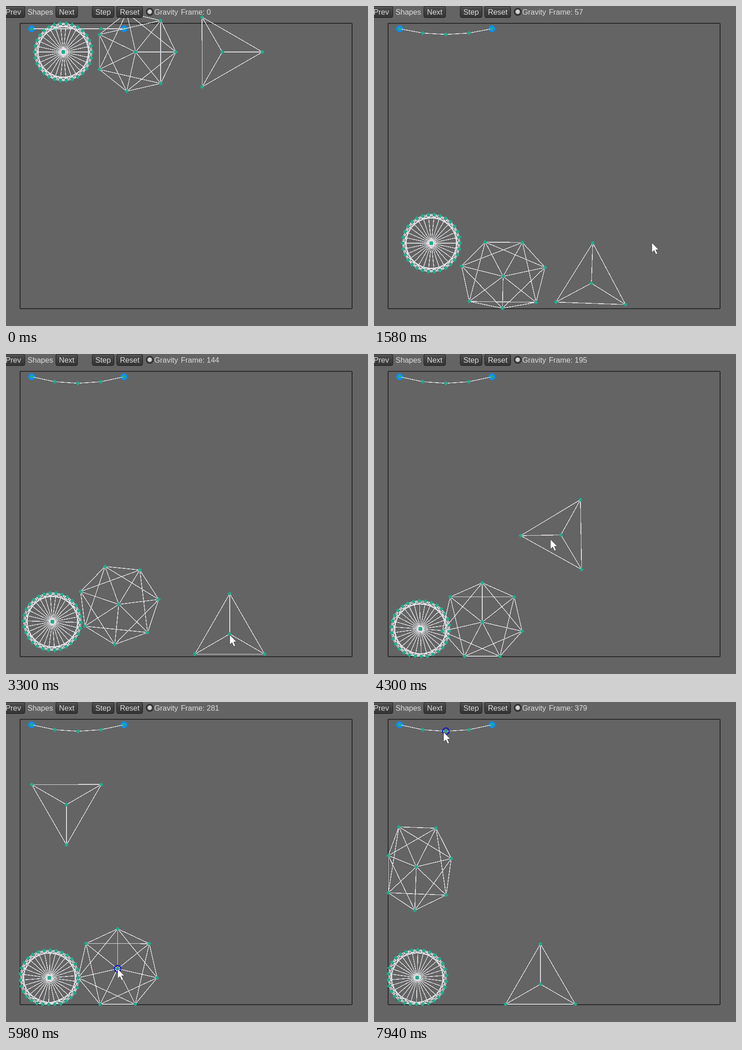
An HTML page for the animation above (8 s loop, 796 by 703 pixels).

```html
<!DOCTYPE html>
<html lang="en">
<head>
<meta charset="utf-8">
<title>Verlet shapes</title>
<style>
html, body { margin: 0; width: 100%; height: 100%; overflow: hidden; background: #646464; }
svg { display: block; width: 100%; height: 100%; }
text { font: 16.5px "Liberation Sans", Arial, sans-serif; fill: #dcdcdc; white-space: pre; }
.line { fill: none; stroke: #e0e0e4; stroke-width: 1.45; shape-rendering: crispEdges; }
.node { fill: #22ab8b; }
</style>
</head>
<body>
<svg viewBox="0 0 796 703">
  <defs>
    <linearGradient id="face" x1="0" y1="0" x2="0" y2="1">
      <stop offset="0" stop-color="#505050"/>
      <stop offset=".5" stop-color="#3c3c3c"/>
      <stop offset="1" stop-color="#303030"/>
    </linearGradient>
  </defs>
  <rect width="796" height="703" fill="#646464"/>
  <rect x="31" y="38" width="730" height="627" rx="1.5" fill="none" stroke="#292929" stroke-width="2"/>
  <g id="scene"></g>
  <g id="ui"></g>
  <circle id="ring" r="7.2" fill="none" stroke="#0808d8" stroke-width="2"/>
  <path id="mouse" d="M0 0V21.5L5 17L8.8 25.5L12.4 24L8.6 15.6H15Z" fill="#fff" stroke="#333" stroke-width=".8"/>
</svg>
<script>
const LOOP = 8000, STEP = 77.5, TICKS_PER_STEP = 3.915;
const GRAVITY = 0.46; // pixels per tick squared
const BOX = { left: 31.5, right: 760.5, top: 38.5, bottom: 664 };
const $ = id => document.getElementById(id);

function add(parent, tag, attrs, text) {
  const el = document.createElementNS("http://www.w3.org/2000/svg", tag);
  for (const k in attrs) el.setAttribute(k, attrs[k]);
  if (text) el.textContent = text;
  parent.appendChild(el);
  return el;
}

// Simulation tick shown at a moment; the picture advances in even holds
function tickAt(ms) {
  if (ms < 500) return 0;
  const n = Math.min(96, Math.floor((ms - 470) / STEP));
  return Math.floor(3.175 + TICKS_PER_STEP * n);
}

// Poses: tick, x, y, degrees; a pose marked FLY starts a free flight
const FLY = true;
const wheelPath = [
  [0, 126, 101, 0, FLY], [47, 126, 603, 0], [57, 126, 521, 0, FLY], [102, 97, 602, 2, FLY],
  [144, 102, 588, 1.5, FLY], [152, 102, 604, 3], [195, 102, 604, 4.2],
  [281, 95.5, 606, 7.4], [379, 95, 605.5, 7.4]
];
const heptagonPath = [
  [0, 285, 101, 0, FLY], [46, 285, 575, 0], [57, 284, 594, -11.9], [90, 284, 588, 12.9],
  [117, 222, 440, 0, FLY], [144, 248, 550, -7.1, FLY], [152, 240, 589, 12.9], [195, 238, 589, 12.9],
  [281, 245.5, 586, 12.9], [303, 372, 352, 5, FLY], [316, 672, 229, 10, FLY],
  [339, 512, 115, -5.2, FLY], [379, 93, 362, -10.9]
];
const trianglePath = [
  [0, 475.5, 101, 0, FLY], [46, 475.5, 587, 0], [57, 478, 609, 32], [80, 492, 615, 30],
  [149, 492, 615, 30], [192, 381, 402, 57, FLY], [195, 411, 397.5, 59, FLY], [216, 675, 460, 110, FLY],
  [237, 585, 600, 150], [249, 450, 430, 120, FLY], [281, 133, 225.5, 90, FLY],
  [324, 225, 590, 115, FLY], [339, 324, 599, 139.8], [360, 366, 620, 150]
];

function sample(path, tick) {
  const i = path.findIndex(p => p[0] > tick);
  if (i < 0) return path[path.length - 1];
  if (i === 0) return path[0];
  const a = path[i - 1], b = path[i], dt = b[0] - a[0], s = (tick - a[0]) / dt;
  const out = [0, 1, 2, 3].map(j => a[j] + (b[j] - a[j]) * s);
  if (a[4]) out[2] -= GRAVITY / 2 * dt * dt * s * (1 - s);
  return out;
}

const clamp = (v, lo, hi) => Math.min(hi, Math.max(lo, v));
const pt = p => p[0].toFixed(1) + " " + p[1].toFixed(1);
const seg = (a, b) => "M" + pt(a) + "L" + pt(b);
const diamond = p => "M" + pt([p[0], p[1] - 4.6]) + "l4.6 4.6l-4.6 4.6l-4.6 -4.6z";

const scene = $("scene");
for (const cx of [56.5, 259.5]) add(scene, "circle", { cx, cy: 50, r: 7.6, fill: "#0a8ff2" });
const layer = () => ({
  lines: add(scene, "path", { class: "line" }),
  nodes: add(scene, "path", { class: "node" })
});
const rope = layer();
const makeBody = (n, r, path) => ({ n, r, path, ...layer() });
const wheel = makeBody(30, 63.3, wheelPath);
const hub = add(scene, "rect", { class: "node", width: 8, height: 8, rx: 2 });
const heptagon = makeBody(7, 88.5, heptagonPath);
const triangle = makeBody(3, 88.5, trianglePath);

// Grabs: body, first tick, release tick
const grabs = [[heptagon, 90, 117], [triangle, 149, 192], [triangle, 237, 249], [heptagon, 281, 303]];
const mousePath = [
  [37, 735, 545], [43, 735, 545], [57, 611, 520], [144, 492, 617],
  [195, 388, 407], [339, 227, 270], [379, 153, 66]
];
for (const [body, from, to] of grabs) {
  for (const tick of [from, to]) mousePath.push([tick, ...sample(body.path, tick).slice(1, 3)]);
}
mousePath.sort((a, b) => a[0] - b[0]);

// Pressed against a wall by share e, an axis shrinks at its ends and bulges inside
const squash = (v, r, e, side) => v * (1 + e * (0.4 - 0.85 * v * v / (r * r)) + 0.3 * side);

function drawBody(body, tick) {
  const { n, r } = body, [, x, y, deg] = sample(body.path, tick);
  const top = tick < 25 ? -99 : BOX.top;
  const rim = Array.from({ length: n }, (_, i) => {
    const a = deg * Math.PI / 180 + i * 2 * Math.PI / n;
    return [r * Math.cos(a), r * Math.sin(a)];
  });
  const ex = Math.max(0, ...rim.map(p => Math.max(BOX.left - x - p[0], x + p[0] - BOX.right))) / r;
  const ey = Math.max(0, ...rim.map(p => Math.max(top - y - p[1], y + p[1] - BOX.bottom))) / r;
  const pts = rim.map(([u, v]) => [
    clamp(x + squash(u, r, ex, ey), BOX.left, BOX.right),
    clamp(y + squash(v, r, ey, ex), top, BOX.bottom)
  ]);
  const c = [x, y], skip = Math.floor(Math.sqrt(n));
  let d = "";
  pts.forEach((p, i) => {
    d += seg(c, p) + seg(p, pts[(i + 1) % n]);
    if (skip > 1) d += seg(p, pts[(i + skip) % n]);
  });
  body.lines.setAttribute("d", d);
  body.nodes.setAttribute("d", pts.concat(body === wheel ? [] : [c]).map(diamond).join(""));
  return body.center = c;
}

function drawRope(tick) {
  const sag = 14.3 * (1 - Math.cos(tick * 0.1) * Math.exp(-tick / 30));
  const pts = [0, 0.76, 1, 0.76, 0].map((k, i) => [56.5 + i * 50.75, 50 + sag * k]);
  rope.lines.setAttribute("d", "M" + pts.map(pt).join("L"));
  rope.nodes.setAttribute("d", pts.map(diamond).join(""));
  return pts[2];
}

const ui = $("ui");
const label = (x, s, anchor = "start") => add(ui, "text", { x, y: 18.6, "text-anchor": anchor }, s);
for (const [x, w, s] of [[-10, 52, "Prev"], [109, 49, "Next"], [189, 49, "Step"], [243, 58, "Reset"]]) {
  add(ui, "rect", { x: x + .5, y: .5, width: w - 1, height: 25, rx: 4, fill: "url(#face)", "fill-opacity": .92, stroke: "#1b1b1b" });
  add(ui, "path", { d: `M${x + 4} 1.7H${x + w - 4}`, stroke: "#6a6a6a", "stroke-width": .8 });
  label(x + w / 2, s, "middle");
}
label(47.5, "Shapes");
add(ui, "circle", { cx: 316, cy: 13, r: 7.7, fill: "#484848", stroke: "#1e1e1e", "stroke-width": 1.4 });
add(ui, "circle", { cx: 316, cy: 12.6, r: 4.8, fill: "#d2d2d2" });
label(326, "Gravity");
const counter = label(384.4, "Frame: 0");

function draw(tick) {
  counter.textContent = "Frame: " + tick;
  const mid = drawRope(tick);
  for (const body of [wheel, heptagon, triangle]) drawBody(body, tick);
  hub.setAttribute("x", wheel.center[0] - 4);
  hub.setAttribute("y", wheel.center[1] - 4);

  const grab = grabs.find(g => tick >= g[1] && tick < g[2]);
  const held = grab ? grab[0].center : tick > 376 ? mid : null;
  const ring = $("ring"), mouse = $("mouse");
  ring.style.display = held ? "" : "none";
  if (held) ring.setAttribute("transform", `translate(${held})`);

  const m = grab ? [tick, ...held] : sample(mousePath, tick);
  mouse.style.display = tick < mousePath[0][0] ? "none" : "";
  mouse.setAttribute("transform", `translate(${m[1]} ${m[2]})`);
}

const start = performance.now();
function play() {
  draw(tickAt((performance.now() - start) % LOOP));
  requestAnimationFrame(play);
}
play();
</script>
</body>
</html>
```
